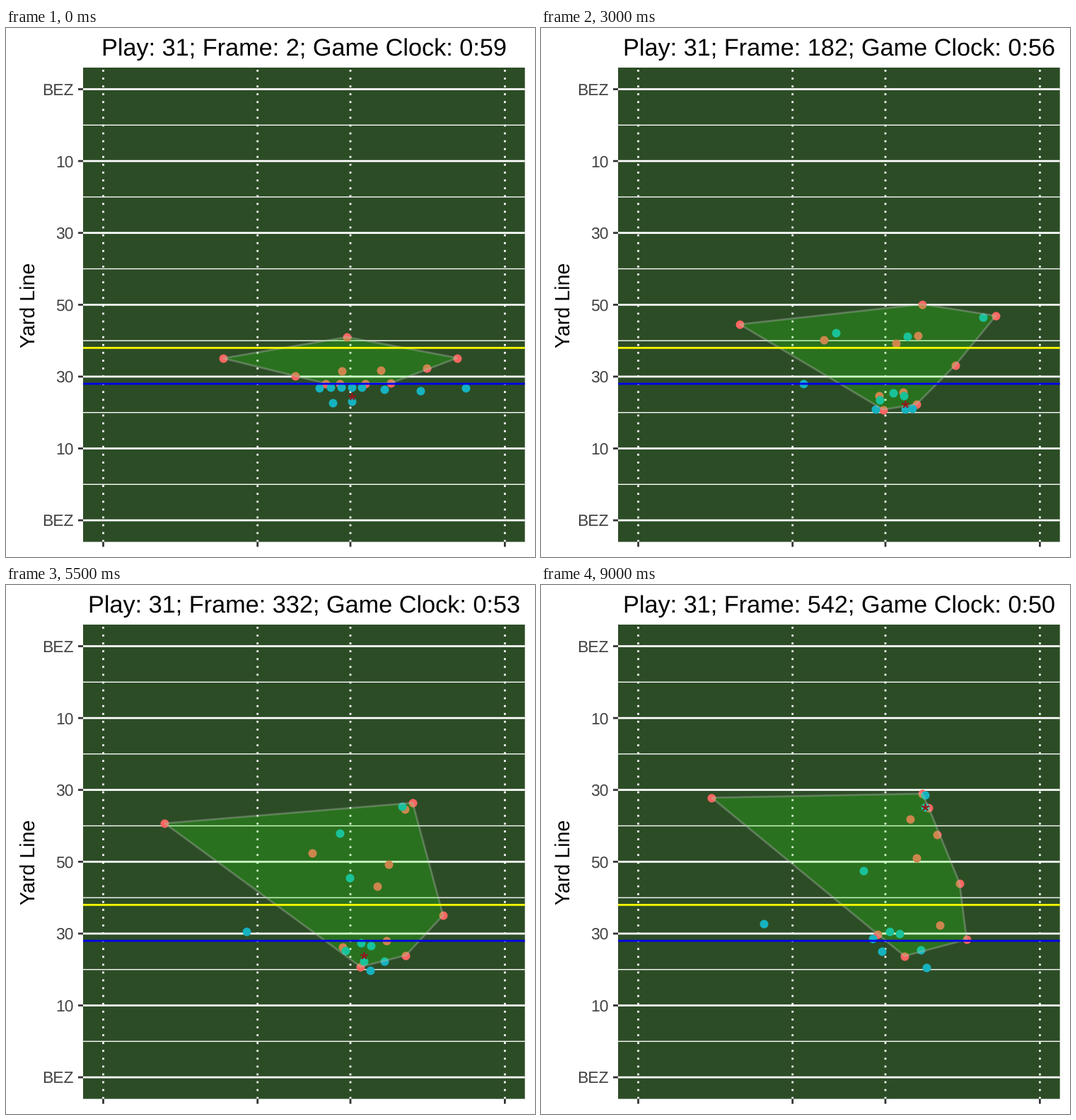
These frames come from a looping animation (748 by 748 pixels, 9500 ms). A matplotlib script:

```python
import numpy as np
import matplotlib.pyplot as plt
from matplotlib.animation import FuncAnimation
from matplotlib.patches import Polygon, Rectangle

SIZE, DPI = 748, 100
PX = 72 / DPI                       # points per pixel
STEPS, INTERVAL = 19, 500
LEFT, RIGHT, TOP, BOTTOM = 109, 733.7, 56, 726.6
YARD = 5.08
GOAL = BOTTOM - 6 * YARD
FIELD, RED, CYAN, BALL = "#2C4C26", "#F96660", "#16B2C0", "#8F1A1C"
LINE = 2.77

# Seconds of the throw, the catch and the last step
THROW, CATCH, END = 5.75, 7.5, 9
CATCH_AT = np.array([548, 311])
DRIFT = np.array([-10, -4])

# Key points of the long runs and of the short ones near the line
LONG, SHORT = (0, 3, 5.5, CATCH), (0, 3, CATCH)
COVERAGE = [
    [(482, 437), (539, 390.5), (575, 308), (530, 279)],
    [(307, 467), (281, 419), (224.5, 337), (219.5, 300)],
    [(638, 466.5), (643, 407), (564, 317), (548, 318)],
    [(409, 492), (400, 441), (433, 379), (505, 345)],
    [(475, 485), (502, 446), (525.5, 426), (526, 407)],
    [(595, 481), (533, 434.5), (541, 394.5), (566, 374)],
    [(530, 484), (586, 476.5), (618, 467), (600, 442)],
]
RECEIVERS = [
    [(443, 509), (417.5, 431), (472, 351), (538, 316.5)],
    [(650, 509), (625, 409), (560, 313), (540, 290)],
]
RUSH = [
    [(452, 502.5), (484, 539.5), (513, 532.5)],
    [(472.5, 503), (478, 520), (473, 501)],
    [(508, 503), (512.5, 515), (564.5, 489)],
    [(544.5, 502), (531, 532), (604, 509)],
]
BACKS = [
    [(489, 528), (515, 539), (492, 522)],       # passer
    [(462.5, 530), (371.5, 503), (325, 482.5)],
    [(586, 512.5), (518, 435.5), (466, 408)],
    [(535, 510.5), (525, 538), (547, 520)],
]
BLOCKS = [
    [(473, 539), (555, 545)],
    [(479, 526), (479, 504)],
    [(498.5, 515.5), (503, 494)],
    [(513.5, 519.5), (517.5, 497)],
]
# Blockers line up in an even row
BACKS += [[(459 + 14.8 * i, 507.5), *b] for i, b in enumerate(BLOCKS)]


def run(paths, keys, t):
    """Smooth Hermite motion through the key points, starting from rest."""
    p, keys = np.array(paths, float), np.array(keys)
    v = np.gradient(p, keys, axis=1)
    v[:, 0] = 0
    t = min(t, keys[-1])
    k = min(np.searchsorted(keys, t, side="right"), len(keys) - 1) - 1
    h = keys[k + 1] - keys[k]
    s = (t - keys[k]) / h
    ease = s * s * (3 - 2 * s)
    return (p[:, k] * (1 - ease) + p[:, k + 1] * ease
            + h * s * (1 - s) * ((1 - s) * v[:, k] - s * v[:, k + 1]))


def pursue(p, step):
    """Close in on the catch, at most half of the way."""
    gap = CATCH_AT - p
    dist = np.hypot(*gap.T)[:, None]
    return p + gap * np.minimum(step / dist, 0.5)


def ball_at(t, receiver):
    hand = run(BACKS[:1], SHORT, min(t, THROW))[0] - (0, 7.5)
    if t < CATCH:
        return hand + (CATCH_AT - hand) * max(0, t - THROW) / (CATCH - THROW)
    return CATCH_AT + (receiver - CATCH_AT) * (t - CATCH) / (END - CATCH)


def hull(points):
    pts = sorted(map(tuple, points))

    def chain(seq):
        out = []
        for x, y in seq:
            while len(out) > 1:
                (px, py), (qx, qy) = out[-2:]
                if (qx - px) * (y - py) - (qy - py) * (x - px) > 0:
                    break
                out.pop()
            out.append((x, y))
        return out[:-1]

    return chain(pts) + chain(pts[::-1])


plt.rcParams["font.family"] = "Liberation Sans"
plt.rcParams["text.hinting"] = "none"
fig = plt.figure(figsize=(SIZE / DPI, SIZE / DPI), dpi=DPI, facecolor="white")
ax = fig.add_axes([0, 0, 1, 1])
ax.set_xlim(0, SIZE)
ax.set_ylim(SIZE, 0)
ax.axis("off")


def line(xs, ys, color, width=LINE, z=1, style="-"):
    ax.plot(xs, ys, color=color, lw=width * PX, ls=style, zorder=z, snap=False,
            solid_capstyle="butt", dash_capstyle="butt")


def label(x, y, text, px, color="black", **kw):
    return ax.text(x, y, text, fontsize=px * PX, color=color, **kw)


def dots(color, z):
    return ax.plot([], [], "o", ms=12 * PX, color=color, mew=0, zorder=z, snap=False)[0]


ax.add_patch(Rectangle((LEFT, TOP), RIGHT - LEFT, BOTTOM - TOP, fc=FIELD, lw=0,
                       zorder=0, snap=False))
for i, name in enumerate(["BEZ", "10", "30", "50", "30", "10", "BEZ"]):
    y = GOAL - 20 * YARD * i
    line([LEFT, RIGHT], [y, y], "white")
    if i < 6:
        line([LEFT, RIGHT], [y - 10 * YARD] * 2, "white", LINE / 2)
    line([LEFT - 7, LEFT], [y, y], "#333333")
    label(96, y + 8.2, name, 22.9, "#444444", ha="right")
for x in (137.5, 355.7, 487, 705.4):
    line([x, x], [BOTTOM, TOP], "white", style=(0, (1, 3)))
    line([x, x], [BOTTOM, BOTTOM + 7], "#333333")
for yards, color in ((48, "yellow"), (38, "#0000EE")):
    line([LEFT, RIGHT], [GOAL - yards * YARD] * 2, color, z=6)

label(41.2, 391.3, "Yard Line", 28.6, rotation=90, rotation_mode="anchor", ha="center")
title = label(421.3, 39.3, "", 34.3, ha="center")

defense, offense = dots(RED, 3), dots(CYAN, 4)
area = Polygon([(0, 0)] * 3, fc=(0.15, 1, 0.03, 0.21), ec=(0.74, 0.74, 0.74, 0.35),
               lw=LINE * PX, zorder=5)
ax.add_patch(area)
ball, = ax.plot([], [], marker=(5, 2, 0), ms=10.5 * PX, mec=BALL, mew=1.8 * PX,
                zorder=7, snap=False)


def update(i):
    t = i * INTERVAL / 1000
    after = max(0, t - CATCH) / (END - CATCH)
    cover = pursue(run(COVERAGE, LONG, t), 22 * after)
    rush = pursue(run(RUSH, SHORT, t), 8 * after)
    catch = pursue(run(RECEIVERS, LONG, t), 8 * after)
    backs = run(BACKS, SHORT, t) + DRIFT * after

    red = np.vstack([cover, rush])
    defense.set_data(*red.T)
    offense.set_data(*np.vstack([catch, backs]).T)
    area.set_xy(hull(red))
    ball.set_data(*ball_at(t, catch[0])[:, None])
    title.set_text(f"Play: 31; Frame: {2 + 30 * i}; Game Clock: 0:{int(59.25 - t)}")
    return defense, offense, area, ball, title


anim = FuncAnimation(fig, update, frames=STEPS, interval=INTERVAL, repeat=True, repeat_delay=0)
plt.show()
```
